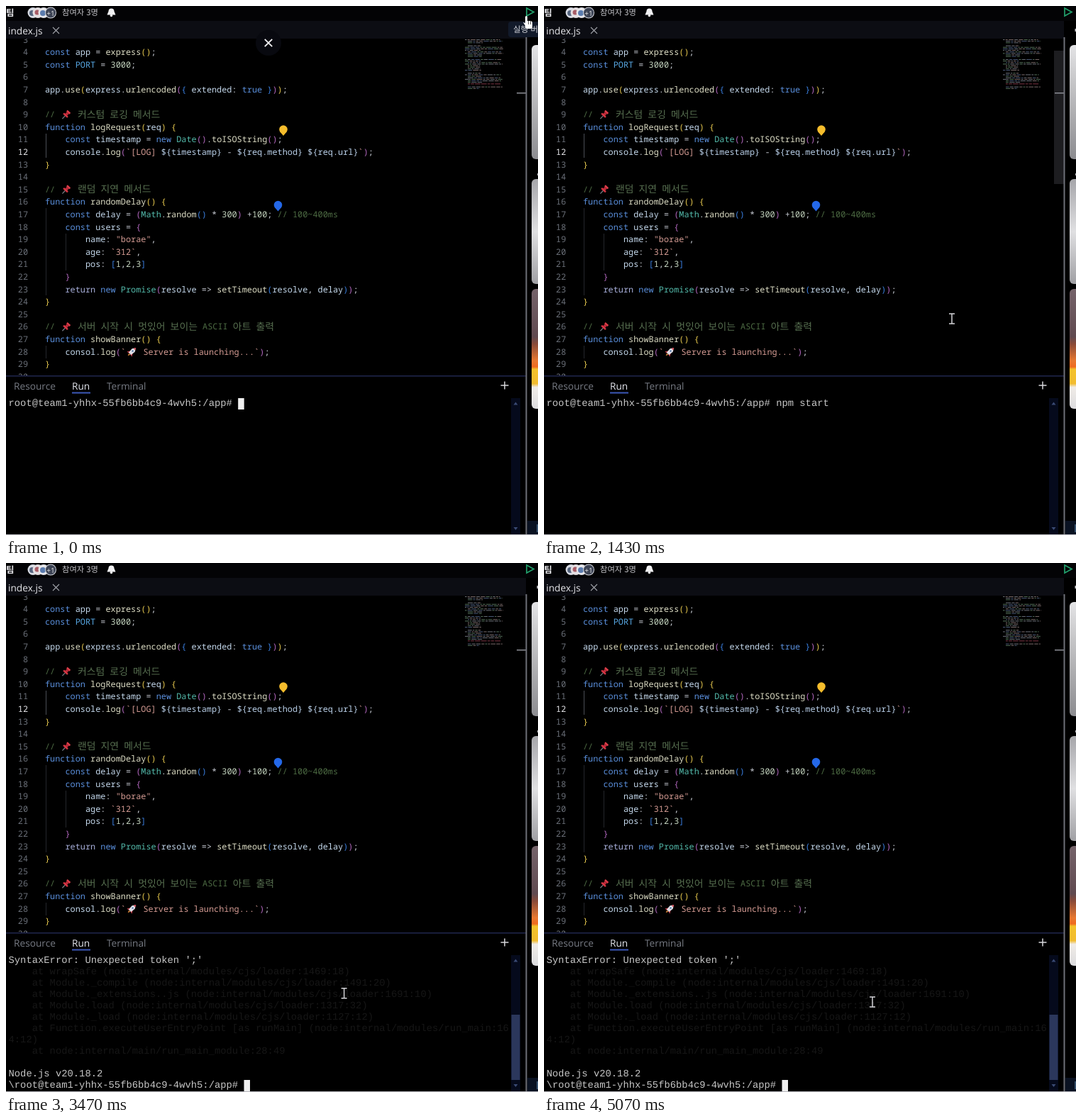
Recreate the animation shown at these times as an HTML page with a canvas. Size 750x746 px, loop 5110 ms.

```html
<!DOCTYPE html>
<html lang="ko">
<head>
<meta charset="utf-8">
<title>Editor session</title>
<style>
html, body { margin: 0; width: 100%; height: 100%; overflow: hidden; background: #000; }
canvas { display: block; }
</style>
</head>
<body>
<canvas id="stage" width="750" height="746"></canvas>
<script>
const ctx = document.getElementById('stage').getContext('2d');
ctx.textRendering = 'geometricPrecision';
const LOOP = 5110;

const CODE_FONT = '11.87px "Noto Sans Mono", monospace';
const HANGUL_FONT = '300 13.9px "Noto Sans CJK KR", "Noto Sans CJK", sans-serif';
const TERM_FONT = '13.83px "Liberation Mono", monospace';
const UI_FONT = '13.7px "Open Sans", sans-serif';
const CODE_ADV = 7.122, CODE_PITCH = 17.6;
const TERM_ADV = 8.3, TERM_PITCH = 16;

const CODE = [
  '',
  'const app = express();',
  'const PORT = 3000;',
  '',
  'app.use(express.urlencoded({ extended: true }));',
  '',
  '// 📌 커스텀 로깅 메서드',
  'function logRequest(req) {',
  '    const timestamp = new Date().toISOString();',
  '    console.log(`[LOG] ${timestamp} - ${req.method} ${req.url}`);',
  '}',
  '',
  '// 📌 랜덤 지연 메서드',
  'function randomDelay() {',
  '    const delay = (Math.random() * 300) +100; // 100~400ms',
  '    const users = {',
  '        name: "borae",',
  '        age: `312`,',
  '        pos: [1,2,3]',
  '    }',
  '    return new Promise(resolve => setTimeout(resolve, delay));',
  '}',
  '',
  '// 📌 서버 시작 시 멋있어 보이는 ASCII 아트 출력',
  'function showBanner() {',
  '    consol.log(`🚀 Server is launching...`);',
  '}',
  ''
];

const PROMPT = 'root@team1-yhhx-55fb6bb4c9-4wvh5:/app# ';
const LOADER = 'node:internal/modules/cjs/loader:';
const OUTPUT = [
  PROMPT + 'npm start', '', '', '',
  '/app/src/index.js:17',
  '    const delay = (Math.; // 100~400ms',
  ' '.repeat(24) + '^',
  '',
  "SyntaxError: Unexpected token ';'",
  `    at wrapSafe (${LOADER}1469:18)`,
  `    at Module._compile (${LOADER}1491:20)`,
  `    at Module._extensions..js (${LOADER}1691:10)`,
  `    at Module.load (${LOADER}1317:32)`,
  `    at Module._load (${LOADER}1127:12)`,
  '    at Function.executeUserEntryPoint [as runMain] (node:internal/modules/run_main:16',
  '4:12)',
  '    at node:internal/main/run_main_module:28:49',
  '',
  'Node.js v20.18.2',
  '\\' + PROMPT
];

const RULES = [
  [/^\/\/.*/, '#4d6b43'],
  [/^`[^`$)]*`?|^"[^"]*"/, '#d39a92'],
  [/^\$\{[^}]*\}/, '#b9cfe8'],
  [/^(const|function|new|true)\b/, '#5a8fdc'],
  [/^return\b/, '#a9b0dc'],
  [/^(Date|Promise|Math)\b/, '#53b9aa'],
  [/^PORT\b/, '#58a8e4'],
  [/^\d+/, '#c3d3be'],
  [/^\w+(?=\()/, '#dcdcc4'],
  [/^\w+/, '#c4d8ec'],
  [/^[^\w()[\]{}"`$/]+/, '#c8ccd4']
];
const BRACKETS = ['#e6c84e', '#b468c0', '#3a7fe0'];

function box(x, y, w, h, color) {
  ctx.fillStyle = color;
  ctx.fillRect(x, y, w, h);
}

function disc(x, y, r, color) {
  ctx.fillStyle = color;
  ctx.beginPath();
  ctx.arc(x, y, r, 0, 7);
  ctx.fill();
}

function shape(points, color) {
  ctx.fillStyle = color;
  ctx.beginPath();
  points.forEach(([x, y]) => ctx.lineTo(x, y));
  ctx.closePath();
  ctx.fill();
}

function lines(color, width, ...segments) {
  ctx.strokeStyle = color;
  ctx.lineWidth = width;
  ctx.beginPath();
  for (const [x1, y1, x2, y2] of segments) {
    ctx.moveTo(x1, y1);
    ctx.lineTo(x2, y2);
  }
  ctx.stroke();
}

function cross(x, y, r, color, width) {
  lines(color, width, [x - r, y - r, x + r, y + r], [x + r, y - r, x - r, y + r]);
}

function label(text, x, y, font, color, align = 'left') {
  ctx.font = font;
  ctx.fillStyle = color;
  ctx.textAlign = align;
  ctx.fillText(text, x, y);
}

function clipped(x, y, w, h, paint) {
  ctx.save();
  ctx.beginPath();
  ctx.rect(x, y, w, h);
  ctx.clip();
  paint();
  ctx.restore();
}

function at(x, y, angle, paint) {
  ctx.save();
  ctx.translate(x, y);
  ctx.rotate(angle);
  paint();
  ctx.restore();
}

function seeded(seed) {
  return () => (seed = (seed * 16807) % 2147483647) / 2147483647;
}

function pushpin(x, y) {
  at(x, y, 0.75, () => {
    box(-0.6, 2, 1.2, 6, '#7d8088');
    box(-3, -6, 6, 2.5, '#e2404c');
    box(-2, -4, 4, 5, '#b82a38');
    box(-4, 0, 8, 2.4, '#d93644');
  });
}

function rocket(x, y) {
  at(x, y, 0.8, () => {
    shape([[-2, 0], [-5, 5], [-1, 4]], '#c8424e');
    shape([[2, 0], [5, 5], [1, 4]], '#c8424e');
    shape([[0, -8], [3, -3], [2.4, 4], [-2.4, 4], [-3, -3]], '#dfdfe6');
    shape([[0, -8], [2, -5], [-2, -5]], '#d0404c');
    disc(0, -1.5, 1.2, '#4b74a8');
    shape([[-1.5, 4.5], [1.5, 4.5], [0, 8]], '#e08a3c');
  });
}

function codeRun(text, x, y, color) {
  for (const part of text.match(/[가-힣]+|📌|🚀|[^가-힣📌🚀]+/gu)) {
    if (part === '📌' || part === '🚀') {
      (part === '📌' ? pushpin : rocket)(x + 8.5, y - 4);
      x += 17.4;
    } else if (/[가-힣]/.test(part)) {
      label(part, x, y + 0.5, HANGUL_FONT, '#566e4f');
      x += ctx.measureText(part).width;
    } else {
      label(part, x, y, CODE_FONT, color);
      x += part.length * CODE_ADV;
    }
  }
  return x;
}

function codeLine(text, y, depth) {
  let x = 55;
  while (text) {
    let token = text[0], color = '#c8ccd4';
    if ('([{'.includes(token)) color = BRACKETS[depth++ % 3];
    else if (')]}'.includes(token)) color = BRACKETS[--depth % 3];
    else {
      const rule = RULES.find(([re]) => re.test(text));
      if (rule) [token, color] = [text.match(rule[0])[0], rule[1]];
    }
    x = codeRun(token, x, y, color);
    text = text.slice(token.length);
  }
  return depth;
}

function marker(x, y, color) {
  disc(x, y - 1, 5.8, color);
  shape([[x - 5, y + 2], [x + 5, y + 2], [x, y + 8]], color);
}

function minimap() {
  const rand = seeded(421);
  const colors = ['#4a5a78', '#6b6f78', '#54705a', '#7a6a6a'];
  for (let row = 0; row < 33; row++) {
    const y = 47 + row * 2.15;
    if (row % 9 === 3) continue;
    const inset = rand() < 0.4 ? 1 : 5;
    const end = 646 + (rand() < 0.45 ? 50 : 22) + rand() * 5;
    for (let x = 646 + inset; x < end;) {
      const w = 2 + rand() * 6;
      const color = row > 28 && row < 31 ? '#7c3442' : colors[Math.floor(rand() * 4)];
      box(x, y, Math.min(w, end - x), 1, color);
      x += w + 1.2;
    }
  }
}

function header() {
  box(0, 0, 750, 21, '#030305');
  box(0, 21, 733, 25, '#0c0d13');
  const bold = 'bold 12.5px "Noto Sans CJK KR", "Noto Sans CJK", sans-serif';
  label('팀', 0, 14, bold, '#e8e8ec');
  disc(38, 9.5, 7.5, '#d9dce4');
  disc(37, 10, 4, '#55657f');
  disc(45, 9.5, 7.5, '#e4dfe2');
  disc(44, 9, 3.5, '#a85c66');
  disc(53, 9.5, 7.5, '#e6e6ea');
  disc(52, 10, 4, '#5b7cae');
  disc(63, 9.5, 8, '#d4d6dc');
  disc(63, 9.5, 7, '#3c4354');
  label('+1', 63, 13.5, '10px "Open Sans", sans-serif', '#eee', 'center');
  label('참여자 3명', 79, 13, '11.3px "Noto Sans CJK KR", "Noto Sans CJK", sans-serif', '#c4c4c8');

  ctx.fillStyle = '#f0f0f2';
  ctx.beginPath();
  ctx.arc(148.5, 7.5, 4, Math.PI, 0);
  ctx.lineTo(154.5, 12.5);
  ctx.lineTo(142.5, 12.5);
  ctx.fill();
  disc(148.5, 13.5, 1.8, '#f0f0f2');

  label('index.js', 3, 40, UI_FONT, '#e6e6ea');
  cross(70.5, 34.5, 4.5, '#a0a2a8', 1.1);

  ctx.strokeStyle = '#22a06c';
  ctx.lineWidth = 1.7;
  ctx.beginPath();
  ctx.moveTo(734, 3);
  ctx.lineTo(744, 8.5);
  ctx.lineTo(734, 14);
  ctx.closePath();
  ctx.stroke();
}

function editor(barAlpha) {
  clipped(0, 46, 733, 475, () => {
    lines('#4a4d55', 1, [56.5, 180, 56.5, 214]);
    lines('#24262c', 1, [56.5, 285, 56.5, 408], [84.5, 321, 84.5, 373], [56.5, 479, 56.5, 497]);
    let depth = 0;
    CODE.forEach((text, i) => {
      const number = i + 3, y = 51.6 + i * CODE_PITCH;
      label(number, 31, y, CODE_FONT, number === 12 ? '#e4e4e8' : '#6a6f78', 'right');
      depth = codeLine(text, y, depth);
    });
    marker(391, 175, '#f5bd2c');
    marker(383.5, 281.5, '#2468e8');
    minimap();
    ctx.globalAlpha = barAlpha;
    box(719, 63, 14, 188, '#1d1d20');
    ctx.globalAlpha = 1;
    box(720, 122, 13, 1.5, '#8c8e96');
  });
}

function card(y, h, stops) {
  const fill = ctx.createLinearGradient(0, y, 0, y + h);
  stops.forEach(([p, color]) => fill.addColorStop(p, color));
  ctx.fillStyle = fill;
  ctx.beginPath();
  ctx.roundRect(741, y, 24, h, 6);
  ctx.fill();
}

function sidePanel() {
  box(735, 21, 15, 725, '#000');
  card(55, 161, [[0, '#e4e4e6'], [0.35, '#c4c4c6'], [1, '#8c8c90']]);
  card(244, 148, [[0, '#a6a6aa'], [0.5, '#e0e0e2'], [1, '#a0a0a4']]);
  card(399, 169, [[0, '#75636a'], [0.4, '#604a50'], [0.46, '#8a4a38'], [0.6, '#e87830'],
    [0.65, '#f06a20'], [0.67, '#f4c22c'], [0.79, '#f2bc30'], [0.82, '#f0ece8'], [1, '#dcdcde']]);
  box(748.5, 32, 1.5, 4, '#c8c8cc');
  box(749, 236, 1, 3, '#b0b0b4');
  box(735, 726, 15, 19, '#0a1222');
  box(748, 731, 2, 11, '#36506c');
  box(732.5, 44, 2, 702, '#6e7078');
}

function terminal(t) {
  box(0, 521, 733, 1.5, '#20264e');
  label('Resource', 11, 541, UI_FONT, '#777b84');
  label('Run', 93, 541, UI_FONT, '#e4e6ee');
  label('Terminal', 142, 541, UI_FONT, '#777b84');
  box(93, 544.5, 26, 2, '#3c58b8');
  lines('#d8d8dc', 1.5, [697.5, 535, 708.5, 535], [703, 529.5, 703, 540.5]);

  const launched = t >= 330, failed = t >= 1750;
  const scrolledBack = t >= 4030 && t < 4700 ? 5 : 0;
  const top = failed ? 8 - scrolledBack : 0;
  const rows = failed ? OUTPUT : [launched ? OUTPUT[0] : PROMPT];

  clipped(0, 553, 712, 192, () => {
    rows.forEach((text, i) => {
      const dim = i > 8 && i < 17;
      label(text, 3.5, 564 + (i - top) * TERM_PITCH, TERM_FONT, dim ? '#161616' : '#c6c6c6');
    });
    const blinkOn = t < 1185 || Math.floor((t - 3785) / 650) % 2 !== 0;
    if (blinkOn) {
      const row = failed ? 19 : launched ? 1 : 0;
      const col = failed ? 40 : launched ? 0 : 39;
      box(3.5 + col * TERM_ADV, 553 + (row - top) * TERM_PITCH, 8.5, 16, '#f0f0f0');
    }
  });

  box(712, 553, 13, 192, '#050a1c');
  if (failed) box(712.5, 637 - scrolledBack * 8, 12, 92, '#2b375c');
  shape([[715.5, 562.5], [721.5, 562.5], [718.5, 558.5]], '#3a4a74');
  shape([[715.5, 735], [721.5, 735], [718.5, 739]], '#3a4a74');
}

const ease = p => p * p * (3 - 2 * p);
const ramp = (t, a, b) => Math.min(1, Math.max(0, (t - a) / (b - a)));

// Pointer stops: time, x, y
const PATH = [
  [0, 735, 17], [330, 735, 17], [630, 691, 117], [1000, 612, 350], [1430, 575, 441],
  [1970, 551, 498], [2770, 518, 559], [3650, 466, 619], [4130, 466, 619],
  [4900, 463, 619], [LOOP, 463, 619]
];

function pointer(t) {
  const i = PATH.findIndex(stop => stop[0] > t);
  const [a, b] = [PATH[i - 1], PATH[i]];
  const p = ramp(t, a[0], b[0]);
  const x = a[1] + (b[1] - a[1]) * p, y = a[2] + (b[2] - a[2]) * p;
  if (t < 350) {
    ctx.fillStyle = '#fff';
    ctx.beginPath();
    ctx.roundRect(x - 3, y - 3, 3, 12, 1.5);
    ctx.roundRect(x - 3, y + 4, 10, 11, 3);
    ctx.fill();
    shape([[x - 6, y + 6], [x - 3, y + 7], [x - 1, y + 14]], '#fff');
    lines('#333', 0.8, [x + 1.5, y + 4, x + 1.5, y + 9], [x + 4.5, y + 4, x + 4.5, y + 9]);
  } else if (x > 640) {
    const tip = [[0, 0], [0, 14], [3.2, 11], [5.4, 16], [7.6, 15], [5.5, 10.2], [10, 10]];
    shape(tip.map(([dx, dy]) => [x + dx, y + dy]), '#fff');
  } else {
    lines('#d4d4d8', 1.5, [x, y - 6.5, x, y + 6.5],
      [x - 4, y - 7, x + 4, y - 7], [x - 4, y + 7, x + 4, y + 7]);
  }
}

function exitButton(t) {
  const p = ease(ramp(t, 380, 720));
  if (p === 1) return;
  const y = 52 - 54 * p;
  ctx.globalAlpha = 1 - p * 0.45;
  disc(370, y, 18, '#08090f');
  cross(370, y, 5.2 - p, '#f0f0f2', 1.9 - p * 0.6);
  ctx.globalAlpha = 1;
}

function tooltip() {
  ctx.fillStyle = '#121a2a';
  ctx.beginPath();
  ctx.roundRect(708, 22, 60, 22, 4);
  ctx.fill();
  label('실행 버튼', 715, 37, '500 11.5px "Noto Sans CJK KR", "Noto Sans CJK", sans-serif', '#d8dae0');
}

function draw(now) {
  const t = now % LOOP;
  box(0, 0, 750, 746, '#000');
  header();
  editor(ramp(t, 420, 560) * (1 - ramp(t, 2850, 3250)));
  terminal(t);
  sidePanel();
  box(0, 745, 750, 1, '#b4b4ba');
  if (t < 350) tooltip();
  exitButton(t);
  pointer(t);
}

let start;
function tick(now) {
  start ??= now;
  draw(now - start);
  requestAnimationFrame(tick);
}
draw(0);
requestAnimationFrame(tick);
</script>
</body>
</html>
```
